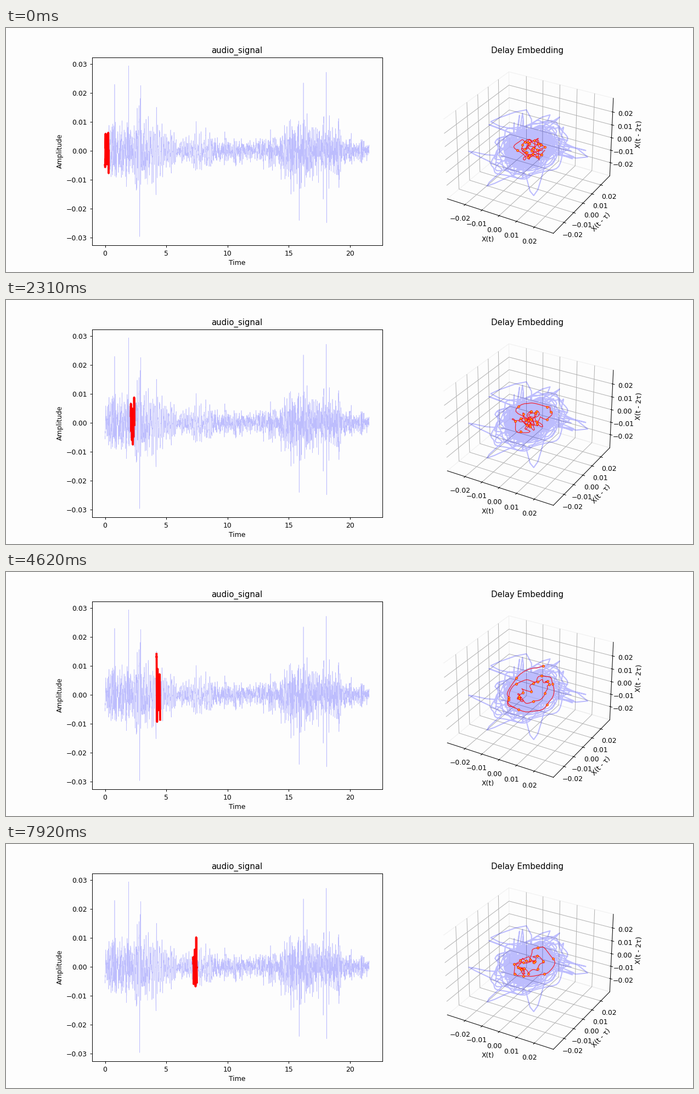
These frames come from a looping animation (1252 px wide and 447 px high, 8000 ms). A matplotlib script:

```python
import numpy as np
import matplotlib.pyplot as plt
from matplotlib.animation import FuncAnimation

DURATION, STEP = 21.56, 0.3
WINDOW = 200                     # samples per highlighted window
DT = STEP / WINDOW
TAU = 8                          # delay in samples
HOLD, TICK, LOOP = 330, 80, 8000
WIDTH, HEIGHT, DPI = 1252, 447, 89.4
BACKGROUND = "#fdfdfd"


def bump(t, center, width):
    return np.exp(-((t - center) / width) ** 2)


def smooth_noise(rng, size, width):
    reach = int(4 * width) + 1
    kernel = bump(np.arange(-reach, reach + 1), 0, width * np.sqrt(2))
    noise = np.convolve(rng.normal(size=size + 2 * reach), kernel, "valid")
    return noise / noise.std()


def make_signal(t):
    """Slow and fast noise under a loudness curve, with a few sharp peaks."""
    rng = np.random.default_rng(11)
    slow = smooth_noise(rng, t.size, 9)
    slow -= np.convolve(slow, np.ones(91) / 91, "same")
    slow /= slow.std()
    fast = smooth_noise(rng, t.size, 2)
    rough = (0.25 + 0.5 * bump(t, 1.5, 1.4)
             + 0.35 / (1 + np.exp(9 - t)))
    loudness = (0.0019 + 0.0037 * bump(t, 2.2, 2.8) + 0.0009 * bump(t, 8, 1)
                + 0.0041 * bump(t, 16, 1.5) + 0.0030 * bump(t, 18.4, 1.1))
    loudness *= np.exp(0.22 * smooth_noise(rng, t.size, 60))
    signal = loudness * (np.sqrt(1 - rough ** 2) * slow + rough * fast)
    signal = 0.028 * np.tanh(signal / 0.028)
    for at, peak in [(0.78, 0.023), (1.92, 0.0294), (2.83, -0.0296),
                     (2.91, 0.0226), (15.85, -0.024), (16.2, 0.0235),
                     (18.07, 0.0272), (18.09, -0.0248)]:
        at = round(at / DT) * DT
        signal += (peak - signal) * bump(t, at, 2 * DT)
    return signal


time = np.arange(0, DURATION, DT)
signal = make_signal(time)
cloud = np.array([signal[2 * TAU:], signal[TAU:-TAU], signal[:-2 * TAU]])

plt.rcParams.update({"figure.facecolor": BACKGROUND,
                     "axes.facecolor": BACKGROUND})
fig = plt.figure(figsize=(WIDTH / DPI, HEIGHT / DPI), dpi=DPI)
grid = fig.add_gridspec(1, 2, width_ratios=[1.5, 1])

wave_ax = fig.add_subplot(grid[0])
wave_ax.plot(time, signal, color="blue", alpha=0.25, lw=0.5)
wave_ax.set(title="audio_signal", xlabel="Time", ylabel="Amplitude",
            xlim=(-1.078, 22.64), ylim=(-0.03253, 0.03235))
wave_now, = wave_ax.plot([], [], color="red", lw=3)

space_ax = fig.add_subplot(grid[1], projection="3d")
space_ax.plot(*cloud, color="blue", alpha=0.25, lw=1.7)
space_now, = space_ax.plot([], [], [], color="red", alpha=0.8, lw=1,
                           marker="o", ms=3, mfc="yellow", mec="red",
                           markevery=10)
limits = (-0.0307, 0.0305)
ticks = np.linspace(-0.02, 0.02, 5)
space_ax.set(title="Delay Embedding", xlabel="X(t)",
             ylabel="X(t - τ)", zlabel="X(t - 2τ)",
             xlim=limits, ylim=limits, zlim=limits,
             xticks=ticks, yticks=ticks, zticks=ticks)
for axis in (space_ax.xaxis, space_ax.yaxis, space_ax.zaxis):
    axis.pane.fill = False
    axis.pane.set_edgecolor((0.9, 0.9, 0.9, 0.5))


def update(frame):
    step = (frame * TICK + TICK - 1) // HOLD
    span = slice(step * WINDOW, (step + 1) * WINDOW)
    wave_now.set_data(time[span], signal[span])
    space_now.set_data_3d(*cloud[:, span])
    return wave_now, space_now


anim = FuncAnimation(fig, update, frames=LOOP // TICK, interval=TICK,
                     repeat=True, repeat_delay=0, blit=False)
plt.show()
```
